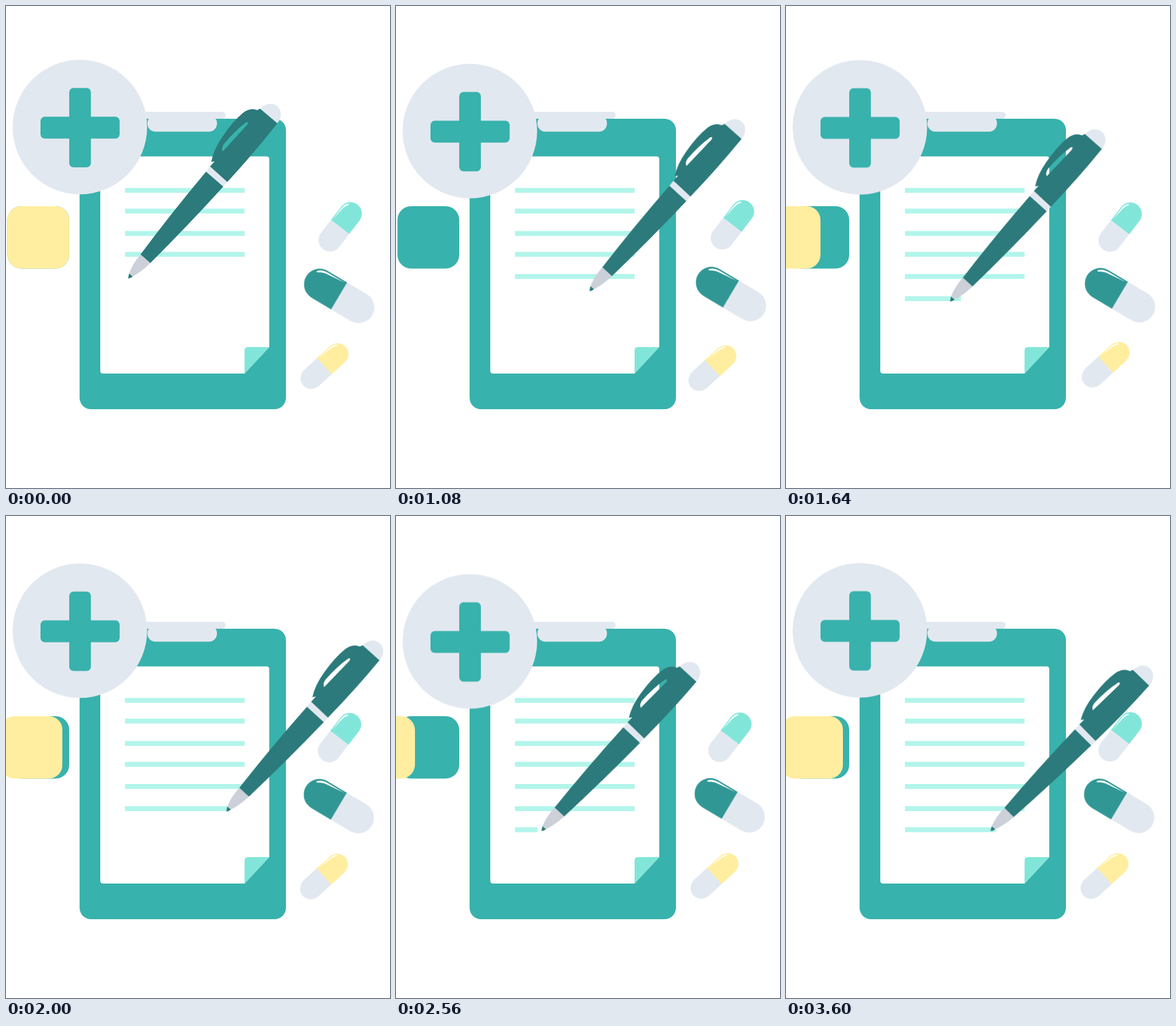
Animation, 668 px wide and 838 px high, one loop 3640 ms. Source, as an HTML page without scripts:

```html
<!DOCTYPE html>
<html lang="en">
<head>
<meta charset="utf-8">
<title>Medical checklist</title>
<style>
  html, body { margin: 0; width: 100%; height: 100%; overflow: hidden; background: #fff; }
  svg { display: block; width: 100vw; height: 100vh; }

  .badge, .card, .pen, .pill, .line { animation: 3640ms linear infinite; }
  .badge { animation-name: bob; animation-timing-function: ease-in-out; }
  .card { animation-name: slide; }
  .pen { animation-name: write; transform-origin: 212px 473px; }
  .pill { animation-timing-function: ease-in-out; }
  .mint { animation-name: shake-mint; color: #81e6d9; }
  .dark { animation-name: shake-dark; color: #319795; }
  .lemon { animation-name: shake-lemon; color: #ffee9f; }
  .line { transform-origin: 207px 0; }
  .first { animation-name: draw-first; }
  .second { animation-name: draw-second; }
  .third { animation-name: draw-third; }

  @keyframes bob {
    0% { transform: translateY(0); }
    16.2% { transform: translateY(-11.8px); }
    28.6% { transform: translateY(7px); }
    44% { transform: translateY(.6px); }
    56.6% { transform: translateY(-11.5px); }
    69.8% { transform: translateY(7.5px); }
    83.5% { transform: translateY(.3px); }
    97.8%, 100% { transform: translateY(-11.8px); }
  }
  @keyframes slide {
    0% { transform: translateX(0); }
    16.5% { transform: translateX(-68px); }
    28.6% { transform: translateX(-112px); }
    31.6% { transform: translateX(-118px); }
    45.1% { transform: translateX(-50px); }
    54.9% { transform: translateX(-12px); }
    58.2% { transform: translateX(0); }
    70.3% { transform: translateX(-77px); }
    78.6% { transform: translateX(-118px); }
    98.9% { transform: translateX(-11px); }
    100% { transform: translateX(-6px); }
  }
  @keyframes write {
    0%, 4.9% { transform: translate(0, 0); }
    16.5% { transform: translate(114px, 0) rotate(1.8deg); }
    25.5% { transform: translate(203px, 0) rotate(2.1deg); }
    29.7% { transform: translate(124px, 22px) rotate(1.1deg); }
    36.8% { transform: translate(-5px, 40px) rotate(.5deg); }
    45.1% { transform: translate(73px, 40px) rotate(1deg); }
    54.9% { transform: translate(170px, 40px) rotate(1.5deg); }
    58.2% { transform: translate(203px, 40px) rotate(1.7deg); }
    65.9% { transform: translate(-5px, 74px) rotate(2deg); }
    70.3% { transform: translate(40px, 74px) rotate(2.2deg); }
    82.4% { transform: translate(130px, 74px) rotate(3.2deg); }
    90.7% { transform: translate(146px, 74px) rotate(3.6deg); }
    100% { transform: translate(143px, 74px) rotate(3.6deg); }
  }
  @keyframes draw-first {
    0%, 4.9% { transform: scaleX(0); }
    16.5% { transform: scaleX(.59); }
    25.5%, 100% { transform: scaleX(1); }
  }
  @keyframes draw-second {
    0%, 36.8% { transform: scaleX(0); }
    45.1% { transform: scaleX(.47); }
    54.9% { transform: scaleX(.865); }
    58.2%, 100% { transform: scaleX(1); }
  }
  @keyframes draw-third {
    0%, 65.9% { transform: scaleX(0); }
    70.3% { transform: scaleX(.188); }
    82.4% { transform: scaleX(.68); }
    90.7%, 100% { transform: scaleX(.76); }
  }
  @keyframes shake-mint {
    0%, 100% { transform: translate(0, 0); }
    8.2% { transform: translate(-8px, 8px); }
    16.8% { transform: translate(7px, -7px); }
    29.7% { transform: translate(4px, -3.7px); }
    45.1% { transform: translate(0, .5px); }
    54.9% { transform: translate(-1.2px, 1.4px); }
    70.3% { transform: translate(-.6px, .7px); }
  }
  @keyframes shake-dark {
    0%, 100% { transform: translate(0, 0); }
    8.2% { transform: translate(11px, -11px); }
    16.8% { transform: translate(-7px, 7px); }
    28.6% { transform: translate(3.4px, -3.4px); }
    37% { transform: translate(-2px, 2px); }
    45.1% { transform: translate(1.4px, -1.2px); }
    54.9% { transform: translate(-.5px, .5px); }
    70.3% { transform: translate(1px, -1px); }
  }
  @keyframes shake-lemon {
    0%, 100% { transform: translate(0, 0); }
    8.2% { transform: translate(7px, -7px); }
    16.5% { transform: translate(1px, -1px); }
    23% { transform: translate(-5px, 5px); }
    29.7% { transform: translate(-3.6px, 3.6px); }
    45.1% { transform: translate(2.2px, -2.4px); }
    54.9% { transform: translate(-.8px, .8px); }
    70.3% { transform: translate(0, -.2px); }
  }
</style>
</head>
<body>
<svg viewBox="0 0 668 838">
  <defs>
    <g id="capsule">
      <path d="M0-20H-29A20 20 0 0 0-29 20H0Z" fill="#e2e8f0"/>
      <path d="M0-20H29A20 20 0 0 1 29 20H0Z" fill="currentColor"/>
      <path d="M2-18.2H27Q37-18 41-12.5Q40-11 38-12.5Q34-15.6 26-16.2Z" fill="#fff"/>
    </g>
    <rect id="tile" x="2.5" y="348" width="107.5" height="108.5" rx="24"/>
    <rect id="rule" x="207" width="208" height="8.5"/>
  </defs>

  <use href="#tile" fill="#38b2ac"/>
  <use href="#tile" class="card" fill="#ffee9f"/>

  <!-- clipboard -->
  <rect x="128" y="196" width="359" height="505" rx="20" fill="#38b2ac"/>
  <path d="M169 261.5H453q5 0 5 5V593L415 639H169q-5 0-5-5V266.500q0-5 5-5Z" fill="#fff"/>
  <path d="M415 639V599q0-6 6-6H458Z" fill="#81e6d9"/>
  <g fill="#e2e8f0">
    <path d="M232 184H376q6 0 6 5.500q0 6.500-7 6.500H232Z"/>
    <rect x="246" y="190" width="121" height="28.500" rx="14"/>
  </g>
  <g fill="#b2f5ea">
    <use href="#rule" y="316.300"/>
    <use href="#rule" y="352.300"/>
    <use href="#rule" y="391.200"/>
    <use href="#rule" y="427.500"/>
    <g class="line first"><use href="#rule" y="466"/></g>
    <g class="line second"><use href="#rule" y="504.500"/></g>
    <g class="line third"><use href="#rule" y="541.200"/></g>
  </g>

  <g class="badge">
    <circle cx="128.500" cy="210.500" r="117" fill="#e2e8f0"/>
    <g fill="#38b2ac">
      <rect x="110" y="142.500" width="37.700" height="138" rx="7.500"/>
      <rect x="60" y="192.500" width="137.700" height="38" rx="7.500"/>
    </g>
  </g>

  <g class="pen">
    <path d="M442 179Q450 170 460 170A18 18 0 0 1 478 188Q478 197 472 204Z" fill="#e2e8f0"/>
    <path d="M348 288L355 279L385 306L378 314Z" fill="#e2e8f0"/>
    <g fill="#2c7a7b">
      <path fill-rule="evenodd" d="M355 279L363 270L357 271Q361 250 376 228Q394 201 412 186Q425 176 437 181L442 178.500L472 204Q432 255 385 306Z
        M377 253Q374 247 379 240Q398 217 418 202L421 202L420 206Z"/>
      <path d="M348 288L378 314Q318 380 251 447L234 432Q286 362 348 288Z"/>
      <path d="M214 465L220.500 470Q216 474 212.500 473.500Z"/>
    </g>
    <path d="M234 432L251 447Q236 462 220.500 470L214 465Q221 447 234 432Z" fill="#cbd0d9"/>
  </g>

  <g class="pill mint"><use href="#capsule" transform="translate(581.3 384) rotate(-52.3)"/></g>
  <g class="pill dark"><use href="#capsule" transform="translate(579.5 504) rotate(210.7) scale(1.36 -1.36)"/></g>
  <g class="pill lemon"><use href="#capsule" transform="translate(554 626) rotate(-42.4) scale(1.02 .95)"/></g>
</svg>
</body>
</html>
```
